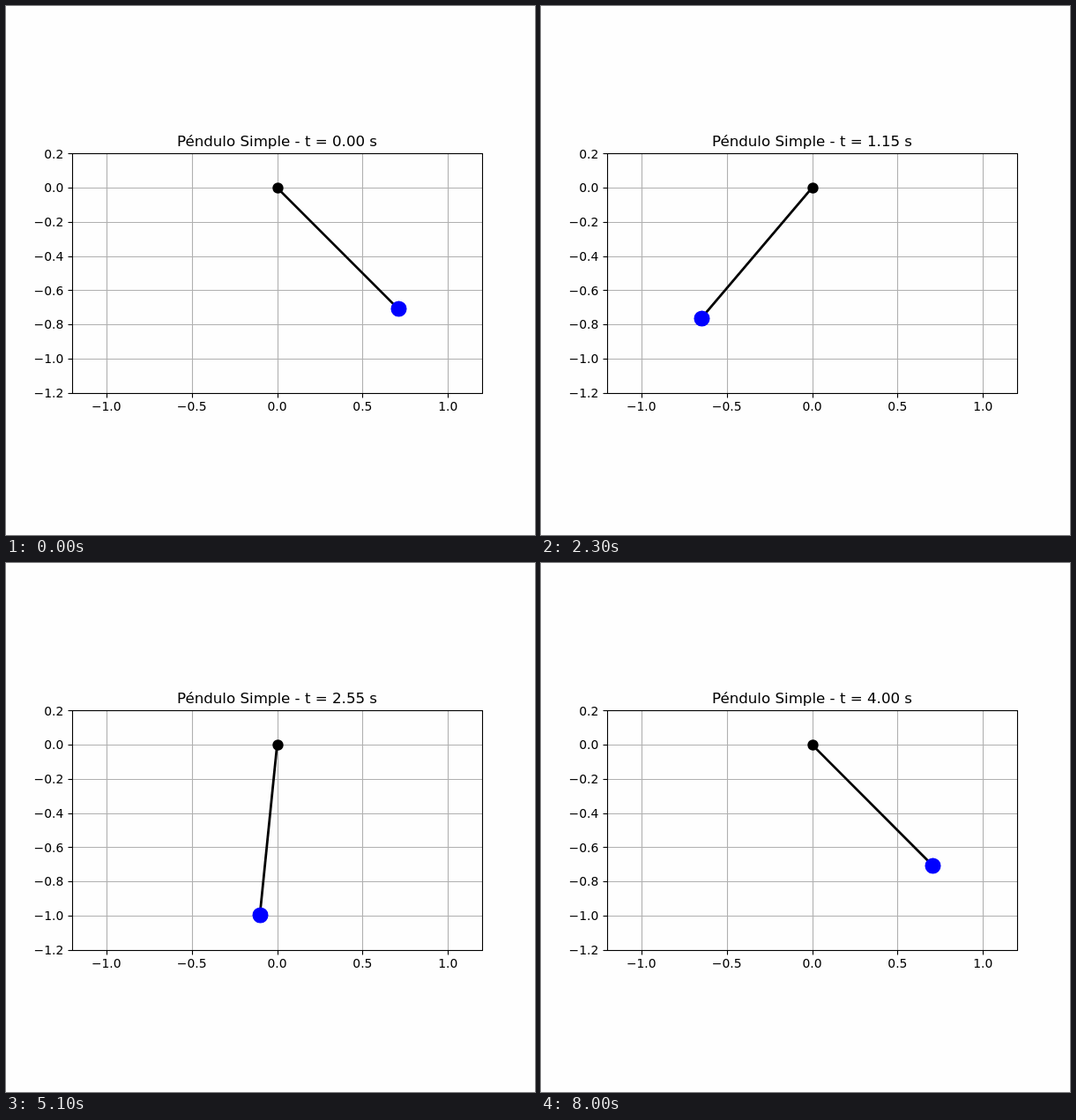
These frames come from a looping animation (600x600 px, 8.1 s). An HTML page with a canvas:

```html
<!DOCTYPE html>
<html lang="es">
<head>
<meta charset="utf-8">
<title>Péndulo Simple</title>
<style>
  html, body { margin: 0; width: 100%; height: 100%; overflow: hidden; background: #fefefe; }
  canvas { display: block; }
</style>
</head>
<body>
<canvas id="stage" width="600" height="600"></canvas>
<script>
const ctx = document.getElementById("stage").getContext("2d");
const FRAMES = 81, STEP_MS = 100, DT = 0.05;
const UNIT = 193.75;                       // pixels per metre
const AMPLITUDE = Math.PI / 4, OMEGA = Math.sqrt(9.8);
const FONT = '"DejaVu Sans", Verdana, sans-serif';

const toX = x => 307.5 + UNIT * x;
const toY = y => 206.125 - UNIT * y;
const snap = v => Math.floor(v + 0.5) + 0.5;
const label = v => v.toFixed(1).replace("-", "\u2212");

const xTicks = [-1, -0.5, 0, 0.5, 1];
const yTicks = [2, 0, -2, -4, -6, -8, -10, -12].map(n => n / 10);
const left = snap(toX(-1.2)), right = snap(toX(1.2));
const top_ = snap(toY(0.2)), bottom = snap(toY(-1.2));

function line(x1, y1, x2, y2, color, width = 1.11) {
  ctx.strokeStyle = color;
  ctx.lineWidth = width;
  ctx.beginPath();
  ctx.moveTo(x1, y1);
  ctx.lineTo(x2, y2);
  ctx.stroke();
}

function dot(x, y, radius, color) {
  ctx.fillStyle = color;
  ctx.beginPath();
  ctx.arc(snap(x), snap(y), radius, 0, 2 * Math.PI);
  ctx.fill();
}

function text(s, x, y, size, align) {
  ctx.font = size + "px " + FONT;
  ctx.textAlign = align;
  ctx.fillStyle = "#000";
  ctx.fillText(s, x, y);
}

function drawGrid() {
  for (const v of xTicks) {
    const x = snap(toX(v));
    line(x, top_, x, bottom, "#b0b0b0");
    line(x, bottom, x, bottom + 5, "#000");
    text(label(v), toX(v), 459, 13.89, "center");
  }
  for (const v of yTicks) {
    const y = snap(toY(v));
    line(left, y, right, y, "#b0b0b0");
    line(left - 5, y, left, y, "#000");
    text(label(v), 65.28, Math.round(toY(v) + 5.3), 13.89, "right");
  }
}

function draw(frame) {
  const t = frame * DT;
  const angle = AMPLITUDE * Math.cos(OMEGA * t);
  const x = toX(Math.sin(angle)), y = toY(-Math.cos(angle));

  ctx.fillStyle = "#fefefe";
  ctx.fillRect(0, 0, 600, 600);
  drawGrid();
  line(toX(0), toY(0), x, y, "#000", 2.78);
  dot(x, y, 9.03, "#00f");
  dot(toX(0), toY(0), 6.25, "#000");

  ctx.strokeStyle = "#000";
  ctx.lineWidth = 1.11;
  ctx.strokeRect(left, top_, right - left, bottom - top_);
  text(`Péndulo Simple - t = ${t.toFixed(2)} s`, 307.5, 159, 16.67, "center");
}

function tick(now) {
  draw(Math.floor(now / STEP_MS) % FRAMES);
  requestAnimationFrame(tick);
}

draw(0);
requestAnimationFrame(tick);
</script>
</body>
</html>
```
